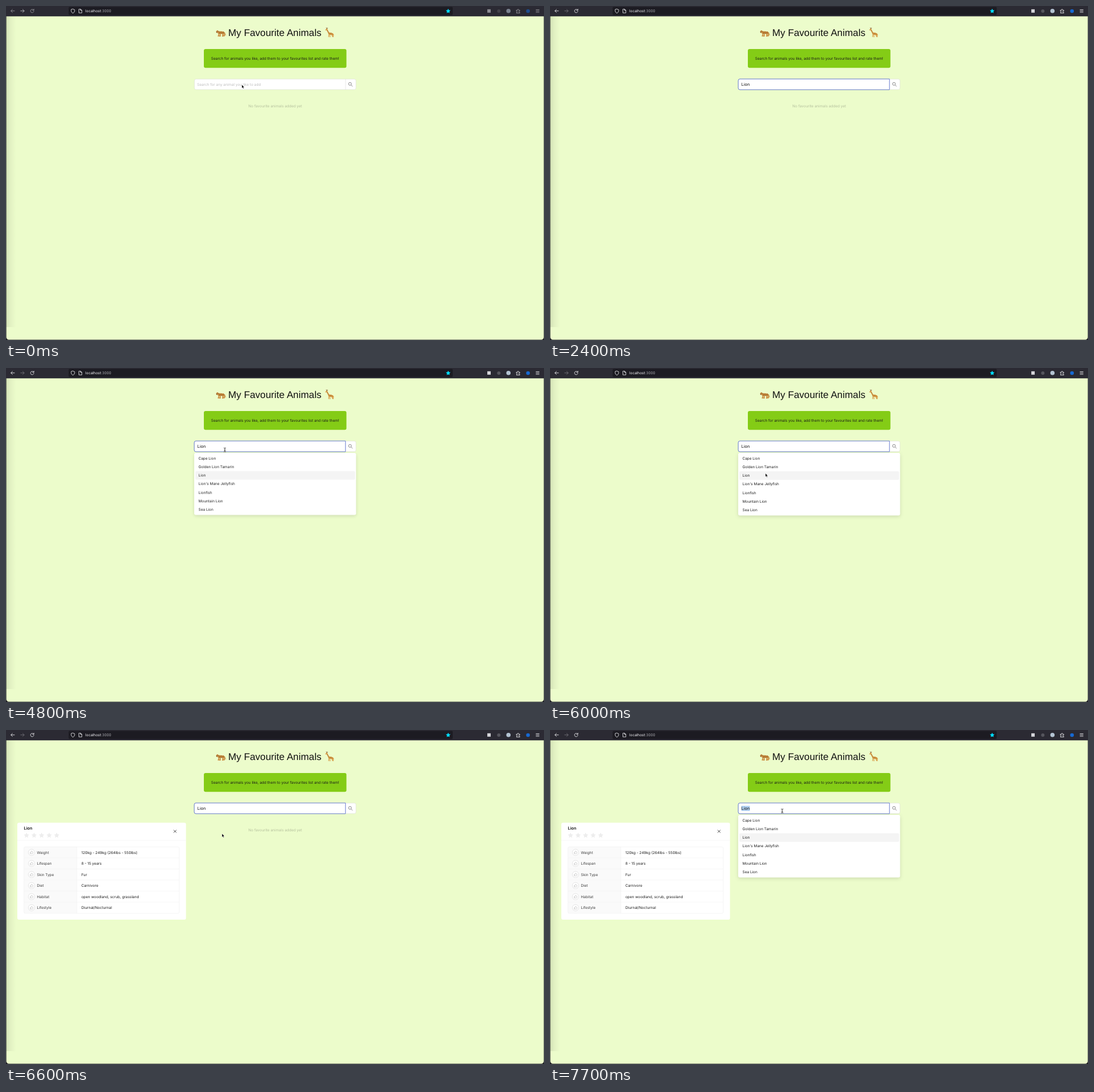
An HTML page that plays this animation: 949x590 px, repeating every 8 s.

```html
<!DOCTYPE html>
<html lang="en">
<head>
<meta charset="utf-8">
<title>My Favourite Animals</title>
<style>
html, body { margin: 0; width: 100%; height: 100%; overflow: hidden; background: #1c1b22; }
svg { display: block; width: 100vw; height: 100vh; }
text { font: 6.46px Inter, "Open Sans", sans-serif; fill: #1a1a1a; white-space: pre; text-rendering: geometricPrecision; }
.line { fill: none; stroke: #fbfbfe; stroke-width: .8; stroke-linecap: round; stroke-linejoin: round; }
.typed { font-size: 7.35px; fill: #111; }

/* Every change is a hard step; 1.25% is 100 ms. */
.a { animation: 8s step-end -10ms infinite; }
.wake { animation-name: wake; }
.forward { animation-name: forward; }
.hint { animation-name: hint; }
.focus { animation-name: focus; }
.l { animation-name: typeL; }
.i { animation-name: typeI; }
.o { animation-name: typeO; }
.n { animation-name: typeN; }
.caret { animation-name: caretMove, caretBlink; }
.select { animation-name: select; }
.card { animation-name: card; }
.menu { animation-name: menu; transform-origin: 0 150px; filter: drop-shadow(0 2.5px 3px rgba(0,0,0,.13)); }
.pointer { animation-name: pointer; }
.arrow { animation-name: arrow; }
.beam { animation-name: beam; }

@keyframes wake { 0% { opacity: .58 } 1.25% { opacity: .7 } 2.5% { opacity: .88 } 3.75%, to { opacity: 1 } }
@keyframes forward { 0% { opacity: .8 } 1.25% { opacity: .65 } 2.5% { opacity: .5 } 3.75%, to { opacity: .38 } }
@keyframes hint { 0% { opacity: 1 } 6.25% { opacity: .5 } 7.5%, to { opacity: 0 } }
@keyframes focus { 0% { opacity: 0 } 6.25% { opacity: .35 } 7.5% { opacity: .75 } 8.75% { opacity: .96 } 11.25%, to { opacity: 1 } }
@keyframes typeL { 0% { fill-opacity: 0 } 16.25%, to { fill-opacity: 1 } }
@keyframes typeI { 0% { fill-opacity: 0 } 26.25%, to { fill-opacity: 1 } }
@keyframes typeO { 0% { fill-opacity: 0 } 28.75%, to { fill-opacity: 1 } }
@keyframes typeN { 0% { fill-opacity: 0 } 30%, to { fill-opacity: 1 } }
@keyframes caretMove { 0% { transform: translate(337.8px) } 16.25% { transform: translate(342.3px) } 30%, to { transform: translate(352.9px) } }
@keyframes caretBlink {
  0% { opacity: 0 } 8.75% { opacity: 1 } 22.5% { opacity: 0 } 37.5% { opacity: 1 } 45% { opacity: 0 }
  52.5% { opacity: 1 } 60% { opacity: 0 } 63.75% { opacity: 1 } 71.25% { opacity: 0 }
  77.5% { opacity: 1 } 82.5% { opacity: 0 } 87.5% { opacity: 1 } 95%, to { opacity: 0 }
}
@keyframes select { 0% { opacity: 0 } 95%, to { opacity: 1 } }
@keyframes card { 0% { opacity: 0 } 78.75%, to { opacity: 1 } }
@keyframes menu {
  0% { opacity: 0; transform: none }
  60% { opacity: .99; transform: scaleY(.992) }
  61.25% { opacity: 1; transform: none }
  81.25% { opacity: .75; transform: scaleY(.95) }
  82.5% { opacity: 0; transform: none }
  95% { opacity: .85; transform: scaleY(.96) }
  96.25%, to { opacity: 1; transform: none }
}
@keyframes pointer {
  0% { transform: translate(416px, 139px) }
  2.5% { transform: translate(417.6px, 140px) }
  35% { transform: translate(430px, 161px) }
  36.25% { transform: translate(446px, 188px) }
  37.5% { transform: translate(453px, 202px) }
  47.5% { transform: translate(451px, 201px) }
  48.75% { transform: translate(436px, 186px) }
  50% { transform: translate(410px, 165px) }
  51.25% { transform: translate(392px, 151px) }
  52.5% { transform: translate(386px, 144.6px) }
  66.25% { transform: translate(386.3px, 146px) }
  67.5% { transform: translate(387px, 152px) }
  68.75% { transform: translate(386px, 162px) }
  70% { transform: translate(384px, 173px) }
  71.25% { transform: translate(382px, 181px) }
  72.5% { transform: translate(381px, 185px) }
  73.75% { transform: translate(380px, 186px) }
  82.5% { transform: translate(381px, 183px) }
  83.75% { transform: translate(388px, 172px) }
  85% { transform: translate(399px, 159px) }
  86.25% { transform: translate(409px, 149px) }
  87.5% { transform: translate(413px, 146px) }
  88.75% { transform: translate(412.5px, 145.2px) }
  90% { transform: translate(411.5px, 144.4px) }
  91.25% { transform: translate(410.4px, 143.6px) }
  92.5%, to { transform: translate(409.6px, 143px) }
}
@keyframes arrow {
  0% { opacity: 1 } 2.5% { opacity: 0 } 35% { opacity: 1 } 52.5% { opacity: 0 }
  67.5% { opacity: 1 } 87.5%, to { opacity: 0 }
}
@keyframes beam {
  0% { opacity: 0 } 2.5% { opacity: 1 } 17.5% { opacity: 0 } 33.75% { opacity: 1 } 35% { opacity: 0 }
  52.5% { opacity: 1 } 67.5% { opacity: 0 } 87.5%, to { opacity: 1 }
}
</style>
</head>
<body>
<svg viewBox="0 0 949 590" preserveAspectRatio="none">
  <defs>
    <linearGradient id="edge">
      <stop offset="0" stop-color="#000" stop-opacity=".1"/>
      <stop offset=".4" stop-color="#000" stop-opacity=".045"/>
      <stop offset="1" stop-color="#000" stop-opacity="0"/>
    </linearGradient>
  </defs>

  <!-- browser bar -->
  <rect width="949" height="590" fill="#1c1b22"/>
  <rect width="949" height="18.2" fill="#2b2a33"/>
  <rect x="110.5" y="1.5" width="677.5" height="14.5" rx="2" fill="#1c1b22"/>
  <path class="line a wake" d="M15 8.7H8.8M11.4 6L8.7 8.7l2.7 2.7"/>
  <path class="line a forward" d="M25.8 8.7H32M29.4 6l2.7 2.7-2.7 2.7"/>
  <path class="line a wake" d="M48.6 7A3 3 0 1 0 49.2 9.2M49.2 5.4V7.6H47"/>
  <path class="line" d="M118 5.4l3 1.1v2.2c0 1.8-1.2 3-3 3.9c-1.8-.9-3-2.1-3-3.9V6.500z"/>
  <path class="line" d="M129 5.600h2.800l2 2v4.600h-4.800zM131.600 5.800v2h2"/>
  <text x="140" y="11" style="fill:#fbfbfe">localhost<tspan fill="#a5a5ab">:3000</tspan></text>
  <path id="bookmark" fill="#00ddff"/>
  <g class="a wake">
    <rect x="849" y="5.800" width="6" height="6" fill="#d4d4d9"/>
    <circle cx="869.300" cy="9" r="3" fill="#55555d"/>
    <circle cx="886.300" cy="8.800" r="3.800" fill="#b4c3d2"/>
    <path class="line" d="M900.600 7.400h1.700v-.7a1 1 0 0 1 2 0v.7h1.900v1.700h-.7a1 1 0 0 0 0 2h.7v1.500h-5.600v-1.600h.6a1 1 0 0 0 0-1.900h-.6z"/>
    <circle cx="920.800" cy="9" r="3.300" fill="#1769d2"/>
    <path class="line" d="M935 6.500h5.400M935 8.800h5.400M935 11.100h5.400"/>
  </g>

  <!-- page -->
  <path d="M.6 18.200H948.600V585a4.500 4.500 0 0 1-4.500 4.500H5.100A4.500 4.500 0 0 1 .6 585z" fill="#ecfccb"/>
  <rect x=".6" y="18.200" width="17" height="549" fill="url(#edge)"/>

  <g fill="none" stroke="#c98a3c" stroke-linecap="round" stroke-linejoin="round">
    <path stroke-width="4.600" d="M376 46.800L383 47.200"/>
    <path stroke-width="1.800" d="M375.300 48v4.800h-1M377.800 48.500v4.700h-.8M382 48.500l.8 4.500h-.9M384.300 48l1 4.700h-1"/>
    <path stroke-width="1.200" d="M384.500 46.500c3 .5 1.200 4.300 2.800 4.800"/>
    <circle cx="373" cy="45.400" r="1.900" fill="#d79b4b"/>
    <path stroke="#4e3218" stroke-width=".9" d="M375.600 45.700h.1M377.800 47.300h.1M379.500 45.800h.1M381.500 47.600h.1M383.300 46h.1M376.300 48.200h.1M379.700 48.500h.1M384.300 48h.1M371.700 45.300h.1M373.500 44.700h.1M371.300 46.700h.6"/>
  </g>
  <g fill="none" stroke="#d79a43" stroke-linecap="round" stroke-linejoin="round">
    <path stroke-width="2" d="M566 41.500L569.500 48.300"/>
    <path stroke-width="3.800" d="M570.400 48.700l4 .7"/>
    <path stroke-width="1.200" d="M569.500 50l-.3 4.500M571.300 50.500l.3 4.100M574.600 50.500l1.500 4M576 50l1.600 4.300M576.300 48.600l1.600 2.800"/>
    <path stroke-width="2" d="M566 41l-1.700 1.200"/>
    <path stroke="#75451d" stroke-width=".9" d="M565.500 39.800l-.4-1.200M566.800 39.900l.1-1.200M567 43.500h.1M568.200 45.700h.1M569.600 47.800h.1M571.700 49.600h.1M573.200 48.200h.1M575 49.800h.1"/>
  </g>
  <text x="392" y="53" style="font:17.2px 'Liberation Sans',Arial,sans-serif;fill:#111">My Favourite Animals</text>

  <rect x="349" y="76" width="251.500" height="33.300" rx="3" fill="#84cc16"/>
  <text x="474.800" y="95.200" text-anchor="middle">Search for animals you like, add them to your favourites list and rate them!</text>
  <text x="474.800" y="178.500" text-anchor="middle" style="fill:#b5c09d">No favourite animals added yet</text>

  <!-- search field -->
  <rect x="332.300" y="129.100" width="285" height="18.600" rx="3" fill="#fff" stroke="#d9dcd2" stroke-width=".6"/>
  <path d="M599 129v19" stroke="#d9d9d9" stroke-width=".6"/>
  <g fill="none" stroke="#777" stroke-width=".9">
    <circle cx="606.800" cy="137.600" r="2.500"/>
    <path d="M608.700 139.500l2.600 2.600"/>
  </g>
  <text class="a hint" x="337" y="141" style="fill:#bdbdbd">Search for any animal you like to add</text>
  <path class="a focus" d="M598.800 128.900H335a3 3 0 0 0-3 3v13a3 3 0 0 0 3 3H598.800z" fill="none" stroke="#5f74d4" stroke-width=".9"/>
  <rect class="a select" x="337.600" y="134" width="14.900" height="9" fill="#b0d0f0"/>
  <text class="typed" x="337.600" y="141.200"><tspan class="a l">L</tspan><tspan class="a i">i</tspan><tspan class="a o">o</tspan><tspan class="a n">n</tspan></text>
  <path class="a caret" d="M0 133.800v9" stroke="#111" stroke-width=".6"/>

  <!-- animal card -->
  <g class="a card">
    <rect x="20" y="163.700" width="297.500" height="171.300" rx="3" fill="#fff"/>
    <text x="31.500" y="176.200" style="font-size:7.300px;font-weight:600">Lion</text>
    <path id="stars" fill="#ededed"/>
    <path d="M295.700 176.500l5 5m0-5l-5 5" stroke="#222" stroke-width=".8"/>
    <path d="M20 195h297.500" stroke="#f0f0f0" stroke-width=".6"/>
    <rect x="31.800" y="206.500" width="93.200" height="117.300" fill="#fafafa"/>
    <path d="M125 206.500v117.300" stroke="#f0f0f0" stroke-width=".6"/>
    <rect x="31.800" y="206.500" width="273.700" height="117.300" rx="2" fill="none" stroke="#efefef" stroke-width=".6"/>
    <g id="facts"></g>
  </g>

  <!-- suggestions -->
  <g class="a menu">
    <rect x="332" y="150" width="285.500" height="110.400" rx="3" fill="#fff"/>
    <rect x="334" y="182.400" width="281.700" height="15.200" rx="1.800" fill="#f4f4f4"/>
    <g id="options"></g>
  </g>

  <g class="a pointer">
    <path class="a arrow" d="M0 0v6.200l1.400-1.300 1 2.200 1.100-.5-1-2.100h1.900z" fill="#000" stroke="#fff" stroke-width=".5"/>
    <g class="a beam" fill="none" stroke-linecap="round">
      <path d="M-1.600-3.500Q0-3.500 0-2.500Q0-3.500 1.600-3.500M0-2.500V2.700M-1.600 3.600Q0 3.600 0 2.700Q0 3.600 1.600 3.600M-.9.900H.9" stroke="#fff" stroke-width="1.300"/>
      <path d="M-1.600-3.500Q0-3.500 0-2.500Q0-3.500 1.600-3.500M0-2.500V2.700M-1.600 3.600Q0 3.600 0 2.700Q0 3.600 1.600 3.600M-.9.900H.9" stroke="#111" stroke-width=".75"/>
    </g>
  </g>
</svg>
<script>
const get = id => document.getElementById(id);

function star(cx, cy, r) {
  const points = Array.from({ length: 10 }, (_, k) => {
    const a = Math.PI * (k / 5 - .5), d = k % 2 ? r * .5 : r;
    return `${(cx + d * Math.cos(a)).toFixed(2)} ${(cy + d * Math.sin(a)).toFixed(2)}`;
  });
  return `M${points.join('L')}Z`;
}

get('bookmark').setAttribute('d', star(780, 9, 4.3));
get('stars').setAttribute('d', [0, 1, 2, 3, 4].map(k => star(36.2 + 13.3 * k, 186.2, 4.9)).join(''));

const options = ['Cape Lion', 'Golden Lion Tamarin', 'Lion', "Lion's Mane Jellyfish", 'Lionfish', 'Mountain Lion', 'Sea Lion'];
get('options').innerHTML = options.map((name, k) =>
  `<text x="339.5" y="${161.8 + 15.22 * k}">${name}</text>`).join('');

const facts = [
  ['Weight', '120kg - 249kg (264lbs - 550lbs)'],
  ['Lifespan', '8 - 15 years'],
  ['Skin Type', 'Fur'],
  ['Diet', 'Carnivore'],
  ['Habitat', 'open woodland, scrub, grassland'],
  ['Lifestyle', 'Diurnal/Nocturnal']
];
get('facts').innerHTML = facts.map(([label, value], k) => `
  <g transform="translate(0 ${216.2 + 19.54 * k})">
    ${k ? '<path d="M31.8-9.8h273.700" stroke="#f0f0f0" stroke-width=".6"/>' : ''}
    <circle cx="45" r="5.600" fill="#fff" stroke="#d6d6d6" stroke-width=".6"/>
    <path d="M42.600-.3h1.300l1.200-2.300q1.200 0 .8 1.900h1.900l-.6 3.200h-4.600zM43.900-.3v2.800" fill="none" stroke="#b4b4b4" stroke-width=".5"/>
    <text x="54.500" y="2.300" style="fill:#3c3c3c">${label}</text>
    <text x="133" y="2.300">${value}</text>
  </g>`).join('');
</script>
</body>
</html>
```
